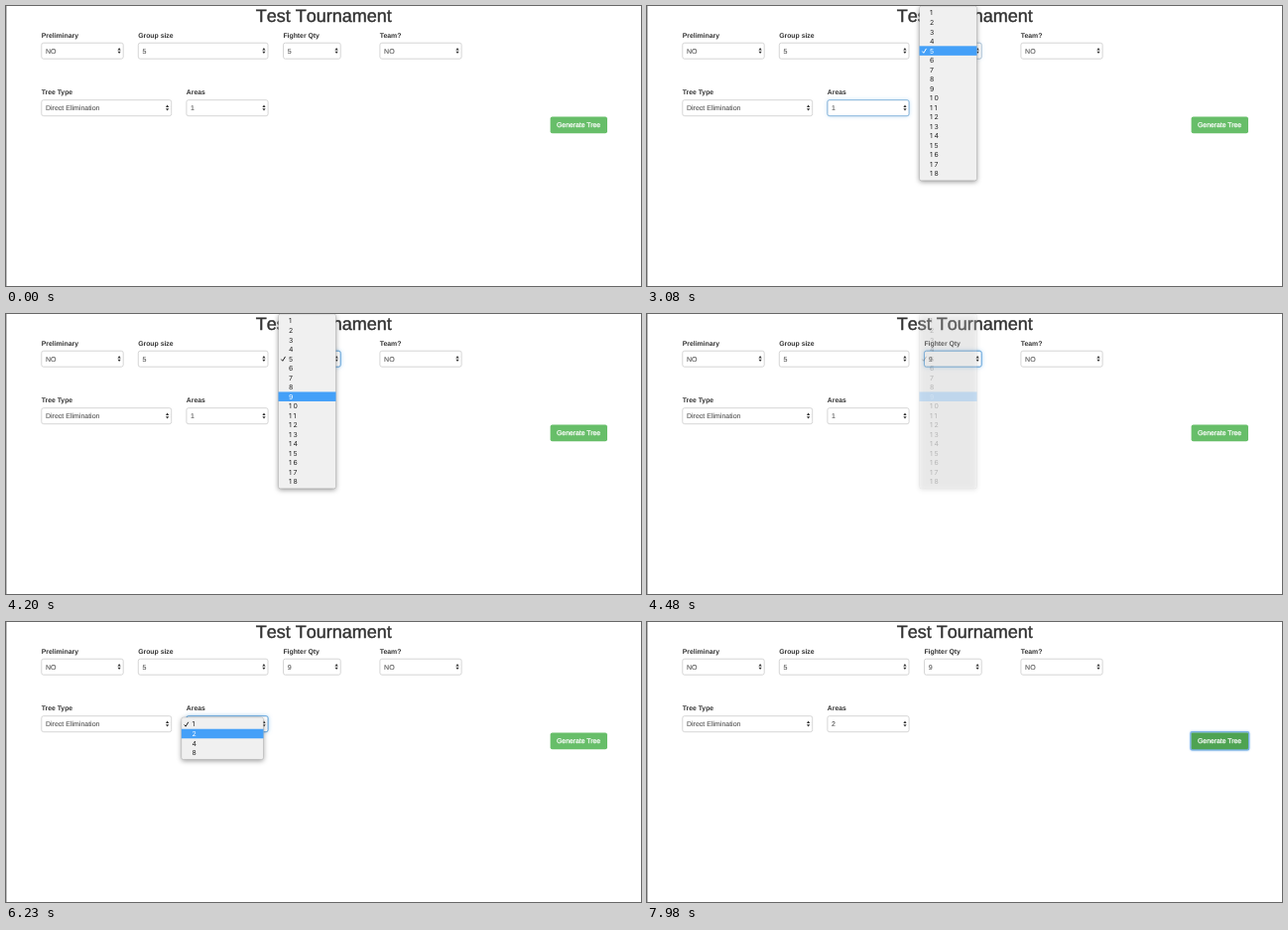
An HTML page with a canvas for the animation above (8000 ms loop, 640x282 px).

```html
<!DOCTYPE html>
<html lang="en">
<head>
<meta charset="utf-8">
<title>Test Tournament</title>
<style>
  html, body { margin: 0; width: 100%; height: 100%; overflow: hidden; background: #fff; }
  canvas { display: block; width: 640px; height: 282px; }
</style>
</head>
<body>
<canvas id="stage"></canvas>
<script>
const WIDTH = 640, HEIGHT = 282, LOOP = 8000, TICK = 70;
const SANS = '"Liberation Sans", Arial, sans-serif';
const MENU_FONT = '6.9px Inter, sans-serif';
const ROW = 9.53;

const canvas = document.getElementById('stage');
const ratio = window.devicePixelRatio || 1;
canvas.width = WIDTH * ratio;
canvas.height = HEIGHT * ratio;
const ctx = canvas.getContext('2d');
ctx.scale(ratio, ratio);
ctx.textRendering = 'geometricPrecision';
ctx.lineJoin = 'round';

const clamp = v => Math.max(0, Math.min(1, v));
// 0 before `start`, rising to 1 over `duration`
const ramp = (t, start, duration) => clamp((t - start) / duration);

// Last value in [[time, value], ...] whose time has passed
const stepAt = (steps, t) => steps.reduce((value, [time, next]) => t >= time ? next : value, null);

const qtyMenu = {
  x: 274.5, y: 0.1, width: 58, checked: 4,
  items: Array.from({ length: 18 }, (_, i) => i + 1),
  open: 3010, close: 4340,
  highlight: [[3010, 4], [3570, 5], [3710, 6], [3780, 7], [3850, 8], [4130, -1], [4200, 8]]
};
const areasMenu = {
  x: 176.8, y: 96.1, width: 82.7, checked: 0,
  items: [1, 2, 4, 8],
  open: 5320, close: 6300,
  highlight: [[5320, 0], [5880, 1], [6160, -1], [6230, 1]]
};

function text(str, x, baseline, font, color, weight = 0) {
  ctx.font = font;
  ctx.fillStyle = color;
  ctx.fillText(str, x, baseline);
  if (weight) {
    ctx.strokeStyle = color;
    ctx.lineWidth = weight;
    ctx.strokeText(str, x, baseline);
  }
}

function roundRect(x, y, w, h, r) {
  ctx.beginPath();
  ctx.roundRect(x, y, w, h, r);
}

function polygon(...points) {
  ctx.beginPath();
  points.forEach(([x, y]) => ctx.lineTo(x, y));
  ctx.fill();
}

function glow(color, blur) {
  ctx.shadowColor = color;
  ctx.shadowBlur = blur * ratio;
}

function select(label, value, x, y, width, focus = 0) {
  text(label, x + 0.2, y - 5.2, `bold 6.85px ${SANS}`, '#333');

  ctx.save();
  roundRect(x + 0.3, y + 0.3, width - 0.6, 16, 2);
  ctx.fillStyle = '#fff';
  if (focus) glow(`rgba(102,175,233,${0.7 * focus})`, 4);
  ctx.fill();
  ctx.restore();
  ctx.lineWidth = 0.7;
  ctx.strokeStyle = '#c4c4c4';
  ctx.stroke();
  if (focus) {
    ctx.strokeStyle = `rgba(90,168,232,${focus})`;
    ctx.lineWidth = 0.9;
    ctx.stroke();
  }

  text(value, x + 4.5, y + 10.6, `7px ${SANS}`, '#555', 0.1);

  const ax = x + width - 4.4, ay = y + 8.2;
  ctx.fillStyle = '#333';
  polygon([ax - 1.6, ay - 0.7], [ax + 1.6, ay - 0.7], [ax, ay - 3]);
  polygon([ax - 1.6, ay + 0.7], [ax + 1.6, ay + 0.7], [ax, ay + 3]);
}

function menu(m, t) {
  const opacity = 1 - ramp(t, m.close - TICK, 4 * TICK);
  if (t < m.open || opacity <= 0) return;
  const height = m.items.length * ROW + 4.2;
  const active = stepAt(m.highlight, t);

  ctx.save();
  ctx.globalAlpha = opacity;
  ctx.save();
  if (t > m.open) {
    glow('rgba(0,0,0,.4)', 5);
    ctx.shadowOffsetY = 1.5 * ratio;
  }
  roundRect(m.x, m.y, m.width, height, 2);
  ctx.fillStyle = '#f0f0f0';
  ctx.fill();
  ctx.restore();
  ctx.strokeStyle = 'rgba(0,0,0,.22)';
  ctx.lineWidth = 0.5;
  ctx.stroke();

  m.items.forEach((item, i) => {
    const top = m.y + 2.1 + i * ROW, middle = top + ROW / 2;
    const color = i === active ? '#fff' : '#222';
    if (i === active) {
      ctx.fillStyle = '#44a0f8';
      ctx.fillRect(m.x, top, m.width, ROW);
    }
    // Digits sit on equal advances
    [...String(item)].forEach((digit, n) =>
      text(digit, m.x + 10.6 + n * 4.4, middle + 2.5, MENU_FONT, color));
    if (i === m.checked) {
      ctx.strokeStyle = color;
      ctx.lineWidth = 1;
      ctx.beginPath();
      ctx.moveTo(m.x + 2.9, middle + 0.5);
      ctx.lineTo(m.x + 4.3, middle + 2.2);
      ctx.lineTo(m.x + 7, middle - 2.2);
      ctx.stroke();
    }
  });
  ctx.restore();
}

function button(hovered, focused) {
  const x = 548.6, y = 111.4, w = 57.4, h = 16.8;
  if (focused) {
    ctx.save();
    glow('rgba(90,160,230,.7)', 2);
    roundRect(x - 0.6, y - 0.6, w + 1.2, h + 1.2, 1.5);
    ctx.strokeStyle = '#78b0e4';
    ctx.lineWidth = 1.4;
    ctx.stroke();
    ctx.restore();
  }
  roundRect(x, y, w, h, focused ? 1.2 : 2);
  ctx.fillStyle = hovered ? '#4ea352' : '#67be69';
  ctx.fill();
  text('Generate Tree', 555, 122.2, `6.85px ${SANS}`, '#fff', 0.25);
}

function draw(t) {
  ctx.fillStyle = '#fff';
  ctx.fillRect(0, 0, WIDTH, HEIGHT);
  ctx.fillStyle = '#bbb';
  ctx.fillRect(0, 0, 1, HEIGHT);

  ctx.fontKerning = 'none';
  text('Test Tournament', 251.8, 16.4, `18px ${SANS}`, '#333', 0.4);
  ctx.fontKerning = 'auto';

  const shift = start => ramp(t, start, 3 * TICK);
  const qtyFocus = shift(3010) - shift(5320);
  const areasFocus = (t >= 2240 ? 1 : 0) - shift(3010) + shift(5320) - shift(7630);

  select('Preliminary', 'NO', 35.5, 36.9, 83);
  select('Group size', '5', 133, 36.9, 131.3);
  select('Fighter Qty', t < qtyMenu.close ? '5' : '9', 279.2, 36.9, 58.3, qtyFocus);
  select('Team?', 'NO', 376.6, 36.9, 82.8);
  select('Tree Type', 'Direct Elimination', 35.5, 94.4, 131.5);
  select('Areas', t < areasMenu.close ? '1' : '2', 181.6, 94.4, 82.8, areasFocus);
  button(t >= 7210, t >= 7630);

  menu(qtyMenu, t);
  menu(areasMenu, t);
}

function frame() {
  const t = performance.now() % LOOP;
  draw(Math.floor(t / TICK) * TICK);
  requestAnimationFrame(frame);
}
frame();
</script>
</body>
</html>
```
